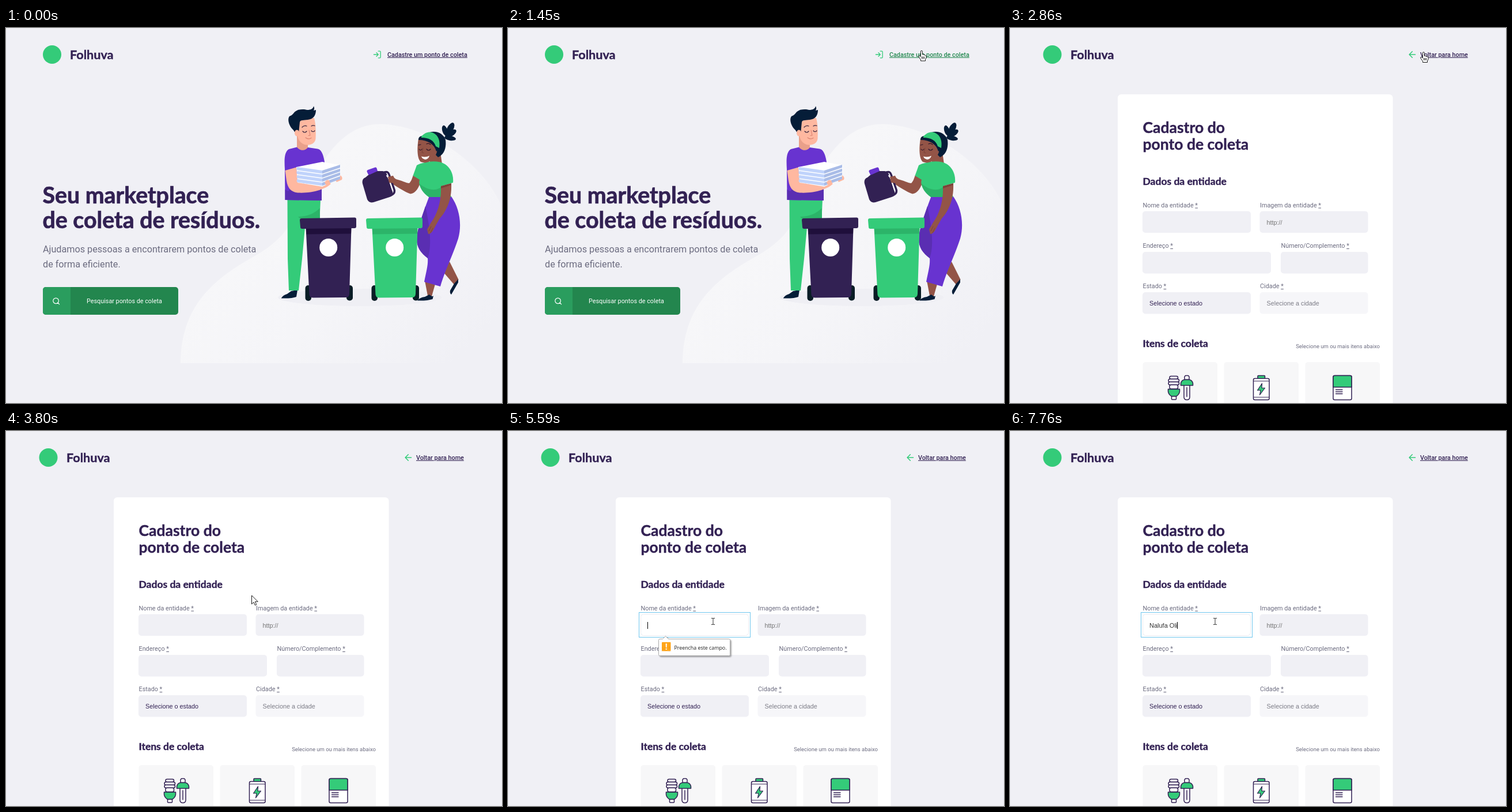
Recreate the animation shown at these times as an HTML page. Size 861 px wide and 650 px high, loop 8000 ms.

```html
<!DOCTYPE html>
<html lang="pt-BR">
<head>
<meta charset="utf-8">
<title>Pontos de coleta</title>
<style>
  html, body { margin: 0; width: 100%; height: 100%; overflow: hidden; background: #f0f0f5; }
  svg { display: block; width: 100%; height: 100%; }
  text { font-family: Roboto, sans-serif; font-size: 10.82px; fill: #6c6c80; white-space: pre; }
  .title { font-family: Lato, sans-serif; font-weight: 700; fill: #322153; stroke: #322153; stroke-width: .4; }
  .hero { font-size: 39.3px; stroke-width: .7; }
  .head { font-size: 26.5px; }
  .section { font-size: 17.5px; }
  .brand { font-size: 21.6px; }
  .link { font-weight: 500; font-size: 10.78px; fill: #322153; text-decoration: underline; }
  .link.hover { fill: #258951; }
  .input { font-family: "Liberation Sans", Arial, sans-serif; }
  .dark { fill: #322153; }
  .req { text-decoration: underline dotted; }
  .lead { font-size: 16.2px; }
  .line { fill: none; stroke-linecap: round; stroke-linejoin: round; }
  .icon { fill: #fff; stroke: #322153; stroke-width: 1.5; stroke-linejoin: round; stroke-linecap: round; }
  .icon .g { fill: #34cb79; }
  .green { fill: #34cb79; } .green2 { fill: #2cb469; }
  .violet { fill: #6833d0; } .violet2 { fill: #5a2eb2; }
  .plum { fill: #322153; } .navy { fill: #051d38; }
  .skin { fill: #ffb8a0; } .skin2 { fill: #e9a08a; }
  .brown { fill: #935447; } .brown2 { fill: #7b4238; }
</style>
</head>
<body>
<svg viewBox="0 0 861 650">
  <defs>
    <linearGradient id="fade" gradientUnits="userSpaceOnUse" x1="480" y1="300" x2="770" y2="590">
      <stop offset="0" stop-color="#f7f7f9"/>
      <stop offset=".45" stop-color="#f5f5f8"/>
      <stop offset="1" stop-color="#f0f0f5"/>
    </linearGradient>
    <filter id="drop" x="-10%" y="-20%" width="125%" height="160%">
      <feDropShadow dx="2" dy="2" stdDeviation="1.2" flood-color="#000" flood-opacity=".35"/>
    </filter>
    <g id="bin">
      <rect x="519.500" y="446" width="10.500" height="27" rx="5" fill="#0a1d26"/>
      <rect x="591" y="446" width="11" height="26.500" rx="5" fill="#0a1d26"/>
      <path d="M520.500 346L599.500 345 596 461Q595.500 467 590 467L533 467.500Q527 467.500 526.500 462Z" fill="currentColor"/>
      <path d="M520.800 347L599.300 346 599 356.500 521.300 357.500Z" fill="var(--shade)"/>
      <path d="M513 330L605 328.500Q608 328.500 608 331.500V344Q608 347 605 347L514 348Q511 348 511 345L510 333Q510 330 513 330Z" fill="currentColor"/>
      <circle cx="559.700" cy="380.500" r="15.500" fill="#fff"/>
    </g>
  </defs>
  <rect width="861" height="650" fill="#f0f0f5"/>

  <g id="home">
    <path fill="url(#fade)" d="M303 581C303 492 350 442 420 402C478 370 489 352 515 298C544 232 584 166 650 166.500C726 168 822 226 858 304L861 318V581Z"/>
    <circle cx="80" cy="46" r="16" class="green"/>
    <text class="title brand" x="111" y="54">Folhuva</text>
    <path class="line" transform="translate(636.500 38.200) scale(.65)" stroke="#34cb79" stroke-width="2" d="M15 3h4a2 2 0 0 1 2 2v14a2 2 0 0 1-2 2h-4M10 17l5-5-5-5M15 12H3"/>
    <text class="link" id="join" x="662" y="49.700">Cadastre um ponto de coleta</text>
    <rect id="joinFocus" x="635.500" y="36.500" width="168.500" height="18.500" fill="none" stroke="#7cc9f3"/>
    <text class="title hero" x="63.500" y="304">Seu marketplace</text>
    <text class="title hero" x="63.500" y="347.200">de coleta de resíduos.</text>
    <text class="lead" x="64" y="389">Ajudamos pessoas a encontrarem pontos de coleta</text>
    <text class="lead" x="64" y="415">de forma eficiente.</text>
    <rect x="64" y="449" width="235" height="48" rx="5" fill="#23864e"/>
    <path d="M112 449H69a5 5 0 0 0-5 5v38a5 5 0 0 0 5 5h43Z" fill="#2a9d5e"/>
    <path class="line" transform="translate(80 466.300) scale(.6)" stroke="#fff" stroke-width="2" d="M19 11a8 8 0 1 1-16 0a8 8 0 0 1 16 0M21 21l-4.350-4.350"/>
    <text x="140" y="477" style="fill:#fff">Pesquisar pontos de coleta</text>

    <ellipse cx="614" cy="467" rx="142" ry="15" fill="#efeff4"/>

    <g id="man">
      <path class="navy" d="M478 468Q481 463 488 461L495 456 506 454 504 466Q497 469 478 468.500Z"/>
      <path class="green" d="M488.500 297H546L544 340 519 346 514 400 508 455 491 455 489 400Z"/>
      <path class="green2" d="M507 327Q530 327 545 312V330H510Z"/>
      <path class="skin2" d="M505 185L524 196V208C520 216 509 214 505 207Z"/>
      <path class="skin" d="M504 170C506 160 514 154 523 155L535 156C538 166 538 180 537.500 192C536 202 526 204 518 202C510 199 507 193 506 186Z"/>
      <path class="navy" d="M508 183C503 182 501 181 499 177C491 170 488 158 492 153C497 151 497 150 499 148C505 140 516 140 523 142C529 142 533 140 534 135.500C536 139 535 141 534 143L538 142C538 151 534 158 524 159C517 160 511 159 510 163Z"/>
      <ellipse class="skin" cx="505" cy="182" rx="4" ry="5.500"/>
      <path class="line" stroke="#3a2740" stroke-width="1.200" d="M515 179q3.500 4 7 0M530 178q3 3.500 6 0M514 172q4-4 8-2M530 170q3-2 6-.5"/>
      <path class="line" stroke="#d9806f" stroke-width="1.100" d="M526 177l2 9-3 .5M520 190q5 4 10 .5"/>
      <path class="violet" d="M484 245C483 228 483 215 491 210L505 206.500C511 214 520 213 524 207L541 209.500C549 211 552 224 554 238L548 242 548 299 484.500 298Z"/>
      <path class="violet2" d="M504 241V266L490 283 484.500 280V298L548 299V270L510 262Z"/>
      <path class="skin" d="M484.500 247L504 241.500 506 265C520 274 543 270 556 264L564 270C556 279 531 287 506 285.500C494 284 489 277 487 265Z"/>
      <path class="skin" d="M569 259L580 255Q585 258 583 263L574 267Z"/>
      <path fill="#fff" d="M504 241L549 232 581 238 580 260 549 275 506 268Z"/>
      <g id="sheets"></g>
      <path class="skin" d="M553 268Q556 262 561 264L563 270 557 274Z"/>
    </g>

    <g id="woman">
      <path class="brown" d="M758 422L770 405 785.500 436 779 446Z"/>
      <path class="navy" d="M785 435.500V441L773 462Q770 460 771 455L778 443Z"/>
      <path class="brown" d="M727 438L745 444 739 465 732 464Z"/>
      <path class="navy" d="M714 472.500Q718 467 727 466L735 462Q740 467 742 464L740.500 470Q731 473 714 472.500Z"/>
      <path class="violet" d="M735 291L773 292C787 312 792 340 785 365C774 398 760 425 754 448L726 440C730 420 733 410 732 399C720 390 713 380 713 366C714 346 724 320 735 291Z"/>
      <path class="violet2" d="M728 309C722 330 713 350 713 366C713 380 720 390 732 399C739 380 737 350 728 309Z"/>
      <path class="brown" d="M707 255L721 261C718 276 711 287 702 287.500C692 284 680 276 672 271L664 267 663 258 670 257 677 262C686 264 695 269 700 269C704 265 705 260 707 255Z"/>
      <path class="brown" d="M737 217L754 215 757 236Q746 242 735 236Z"/>
      <path class="green" d="M713 238C722 233 747 227 762 236C774 244 777 257 776 268L756 274C758 284 772 286 773 293L734 293C721 283 715 271 718 263L706.500 256Z"/>
      <path class="green2" d="M718 270C734 284 752 282 757 273L763 293 734 293C724 286 719 278 718 270Z"/>
      <path class="brown" d="M755 275L773 270C774 293 768 313 753 330L746 342C742 350 739 357 733 357L731 349 738 337C749 322 756 300 755 275Z"/>
      <path class="brown2" d="M755 274L773 269V272L755 278Z"/>
      <g class="navy">
        <ellipse cx="762" cy="178" rx="4.500" ry="9.500" transform="rotate(-18 762 178)"/>
        <ellipse cx="771" cy="175" rx="5.500" ry="12" transform="rotate(28 771 175)"/>
        <ellipse cx="772" cy="183" rx="5" ry="11" transform="rotate(58 772 183)"/>
        <ellipse cx="771" cy="191" rx="4" ry="10" transform="rotate(98 771 191)"/>
        <path d="M735 181C748 177 760 184 763 194C765 210 759 220 750 224L738 212Z"/>
      </g>
      <path class="brown" d="M716 192C713 210 714 227 720 232C732 237 744 228 748 215L749 198C742 186 724 184 716 192Z"/>
      <path class="navy" d="M716 194C716 189 719 187 723 187C737 189 746 196 750 210L747 214C744 202 733 194 716 194Z"/>
      <path class="green" d="M721 188C727 181 735 179 741 181.500C751 186 754 196 752 208L746 205C743 195 734 190 721 190Z"/>
      <path class="line" stroke="#30172a" stroke-width="1.200" d="M717 210q2.500 3.500 5 0M730 210q3.500 4 7 0M716 203l4-1M730 201q4-2 7 1"/>
      <path class="line" stroke="#7b4238" d="M724 208l-2 8 3 .5"/>
      <path fill="#fff" d="M721 222.500Q728 225 735 221.500Q733 228 727.500 228Q722 226.500 721 222.500Z"/>
      <path class="line" stroke="#7b4238" d="M734 352l4-8M737 355l4-8"/>
    </g>

    <g id="jug">
      <path class="line" stroke="#322153" stroke-width="3.500" d="M657 250Q663 248 665 254L674 280Q676 287 668 290"/>
      <path class="plum" d="M619 270Q617 262 624 259L630 254 644 248 654 248Q660 249 662 256L671 284Q673 291 666 293L638 302Q630 304 627 297Z"/>
      <path class="line" stroke="#fff" stroke-width="1.800" d="M661 256Q664 259 665 263L671 281"/>
      <path class="violet" d="M628 246L641 241.500Q643 241 643.500 243L645 248 629.500 255 626.500 249Q626 247 628 246Z"/>
      <path class="brown" d="M663 258L672 256 675 262 673 269 665 268Z"/>
    </g>

    <use href="#bin" style="color:#322153;--shade:#1f0f3b"/>
    <use href="#bin" x="115" style="color:#34cb79;--shade:#2cb469"/>
  </g>

  <g id="form">
    <circle cx="73.500" cy="46" r="16" class="green"/>
    <text class="title brand" x="105" y="54">Folhuva</text>
    <path class="line" transform="translate(689.300 37) scale(.75)" stroke="#34cb79" stroke-width="2" d="M19 12H5M12 19l-7-7 7-7"/>
    <text class="link" id="back" x="712" y="49.700">Voltar para home</text>
    <rect x="187" y="115" width="477.500" height="560" rx="6" fill="#fff"/>
    <text class="title head" x="230.500" y="182">Cadastro do</text>
    <text class="title head" x="230.500" y="210.500">ponto de coleta</text>
    <text class="title section" x="230.500" y="272">Dados da entidade</text>
    <g id="fields"></g>
    <text class="input" x="445.500" y="340.500" style="fill:#757575">http://</text>
    <text class="input dark" x="242" y="480.500">Selecione o estado</text>
    <text class="input" x="445.500" y="480.500" style="fill:#7c7c86">Selecione a cidade</text>
    <text class="title section" x="230.500" y="552.500">Itens de coleta</text>
    <text x="642" y="554.500" text-anchor="end" style="font-size:9.480px">Selecione um ou mais itens abaixo</text>
    <g fill="#f7f7f8">
      <rect x="230.500" y="579" width="129.500" height="90" rx="5"/>
      <rect x="371.500" y="579" width="129.500" height="90" rx="5"/>
      <rect x="512.500" y="579" width="129.500" height="90" rx="5"/>
    </g>
    <g class="icon">
      <rect x="277" y="603.500" width="14.500" height="5" rx="2.500"/>
      <rect x="275" y="608.500" width="18.500" height="5" rx="2.500"/>
      <rect x="275" y="613.500" width="18.500" height="5" rx="2.500"/>
      <rect x="277" y="618.500" width="14.500" height="7" rx="2.500"/>
      <path class="g" d="M274.500 626H294.500V630Q294 635 288.500 638.500H280.500Q275 635 274.500 630Z"/>
      <rect x="280.500" y="638.500" width="8" height="5.500" rx="1"/>
      <path d="M303 609.500V604.500L304.500 602.500H309.500L311 604.500V609.500Z"/>
      <path d="M302 619V639.500Q302 644.500 307 644.500T312 639.500V619M307 623V639"/>
      <path class="g" d="M296.500 619.500V616Q298 609.500 304 609.500H310Q316 609.500 317.500 616V619.500Z"/>
      <rect class="g" x="430" y="602.500" width="12.500" height="5.500" rx="1"/>
      <rect x="422.500" y="607.500" width="27.500" height="37" rx="2.500"/>
      <path d="M423 612H449.500M423 640H449.500" stroke-width="1.200"/>
      <path class="g" d="M437.500 616L429.500 628H435L433.500 636 442.500 624H437Z" stroke-width="1.200"/>
      <rect x="561" y="602.500" width="32" height="42" rx="2.500"/>
      <path class="g" d="M561 622.500V605Q561 602.500 563.500 602.500H590.500Q593 602.500 593 605V622.500Z"/>
      <path d="M565.500 627H577M565.500 630.500H577M565.500 634H577" stroke-width="1.300"/>
    </g>
    <g id="focus">
      <rect x="227.500" y="314.500" width="193" height="43" fill="#fff" stroke="#6fc6ee"/>
      <rect x="230.500" y="317.500" width="187" height="37" rx="5" fill="#fff" stroke="#ebebf1"/>
    </g>
    <text class="input" id="typed" x="242" y="340.500" style="font-size:11px;fill:#333"></text>
    <rect id="caret" y="331" width="1" height="12" fill="#000"/>
    <g id="tip">
      <path d="M264 360.500H268.500L273.500 355.500 278.500 360.500H383.500Q385.500 360.500 385.500 362.500V387.500Q385.500 389.500 383.500 389.500H263.500Q261.500 389.500 261.500 387.500V362.500Q261.500 360.500 264 360.500Z" fill="#fff" stroke="#a3a3a3" filter="url(#drop)"/>
      <rect x="267" y="366" width="15.500" height="15.500" rx="1" fill="#ffa00c"/>
      <path d="M273.600 368.500H275.900L275.500 375.500H274ZM273.700 377H275.800V379H273.700Z" fill="#fff"/>
      <text x="288.500" y="379" style="font-family:'Open Sans',sans-serif;font-size:8.850px;fill:#111">Preencha este campo.</text>
    </g>
  </g>

  <g id="cursor" stroke-linejoin="round">
    <path id="arrow" fill="#fff" stroke="#000" stroke-width=".9" d="M0 0V15l3.500-3.200 2.400 5.200 2.400-1.100-2.400-5.100h4.900Z"/>
    <path id="hand" fill="#fff" stroke="#000" stroke-width=".9" d="M-1.600 9V1.300a1.500 1.500 0 0 1 3 0V6.500l1.200-.3q1.200 0 1.400 1l1-.2q1.100 0 1.300 1h.6q1.200.2 1.200 1.600V12l-1.600 3v2.500H-1.500V15.500L-5 10.600q-.8-1.600.6-2.100 1.200-.3 2.800 1.600ZM2.500 10v4M4.700 10v4M.4 10v4"/>
    <path id="beam" fill="none" stroke="#333" d="M-3-5.500h2l1 .6 1-.6h2M0-5V5M-3 5.500h2l1-.6 1 .6h2"/>
  </g>
</svg>
<script>
const LOOP = 8000, FORM_AT = 2860, BACK_MOVE = 3250, FOCUS_AT = 4100, TIP_AT = 5110;
const el = id => document.getElementById(id);
const show = (id, on) => el(id).setAttribute('visibility', on ? 'inherit' : 'hidden');
const clamp = v => Math.max(0, Math.min(1, v));

// label, x, y, width, fill
const fields = [
  ['Nome da entidade', 230, 317.5, 188, '#f0f0f5'],
  ['Imagem da entidade', 433.5, 317.5, 188, '#f0f0f5'],
  ['Endereço', 230, 388, 223, '#f0f0f5'],
  ['Número/Complemento', 470, 388, 151.5, '#f0f0f5'],
  ['Estado', 230, 458, 188, '#f0f0f5'],
  ['Cidade', 433.5, 458, 188, '#f6f6f9']
];
el('fields').innerHTML = fields.map(([label, x, y, w, fill]) =>
  `<text x="${x + .5}" y="${y - 7}">${label} <tspan class="req">*</tspan></text>` +
  `<rect x="${x}" y="${y}" width="${w}" height="37.5" rx="5" fill="${fill}"/>`).join('');

el('sheets').innerHTML = [0, 1, 2, 3].map(i => {
  const y = i * 7;
  return `<path fill="#c0d3fb" d="M506 ${241 + y}L549 ${247 + y}V${252.5 + y}L506 ${246.5 + y}Q503 ${244 + y} 506 ${241 + y}Z"/>` +
    `<path fill="#a9bce7" d="M549 ${247 + y}L580 ${237 + y * .95}V${242 + y * .95}L549 ${252.5 + y}Z"/>`;
}).join('');

// pointer path: time, x, y
const path = [
  [200, 765, 621], [420, 752, 430], [700, 715, 180], [980, 689, 82], [1060, 692, 77],
  [1250, 712, 44], [1450, 718, 39.5], [2140, 718, 39.5], [2310, 718, 42], [3250, 718, 42],
  [3500, 640, 110], [3750, 450, 270], [3950, 356, 330]
];
function pointerAt(t) {
  const i = path.findIndex(k => k[0] > t);
  if (i < 0) return path[path.length - 1].slice(1);
  const a = path[Math.max(0, i - 1)], b = path[i];
  const p = i ? (t - a[0]) / (b[0] - a[0]) : 0;
  return [a[1] + (b[1] - a[1]) * p, a[2] + (b[2] - a[2]) * p];
}
const inside = (x, y, left, top, w, h) => x >= left && x <= left + w && y >= top && y <= top + h;

const entry = 'Nalufa Oli';
const keys = [6040, 6440, 6590, 6670, 6900, 6990, 7290, 7520, 7690, 7760];

function draw(t) {
  const form = t >= FORM_AT;
  show('home', !form);
  show('form', form);

  const [x, y] = pointerAt(t);
  const onLink = form ? inside(x, y, 690, 38, 106, 16) : inside(x, y, 635, 37, 170, 18);
  const onField = form && fields.some(f => inside(x, y, f[1], f[2], f[3], 37.5));
  show('cursor', t >= 200);
  el('cursor').setAttribute('transform', `translate(${x} ${y})`);
  show('hand', onLink);
  show('beam', onField);
  show('arrow', !onLink && !onField);
  el('join').classList.toggle('hover', onLink);
  el('back').classList.toggle('hover', onLink && t >= BACK_MOVE);
  show('joinFocus', !form && t >= 2460);

  el('focus').setAttribute('opacity', clamp((t - FOCUS_AT + 80) / 230));
  show('focus', form && t >= FOCUS_AT);

  const count = keys.filter(k => k <= t).length;
  const typed = el('typed');
  typed.textContent = entry.slice(0, count);
  const width = count ? typed.getComputedTextLength() : 0;
  el('caret').setAttribute('x', Math.round(242 + width));
  const blinkOn = t < 4650 || (t >= TIP_AT && t < 5670) || t >= keys[0];
  show('caret', form && t >= FOCUS_AT && blinkOn);

  const fadeIn = 1 - Math.pow(1 - clamp((t - TIP_AT) / 780), 3);
  el('tip').setAttribute('opacity', t < 6040 ? fadeIn : .5);
  show('tip', form && t >= TIP_AT && t < 6120);
}

let start;
function tick(now) {
  start ??= now;
  draw((now - start) % LOOP);
  requestAnimationFrame(tick);
}
draw(0);
requestAnimationFrame(tick);
</script>
</body>
</html>
```
